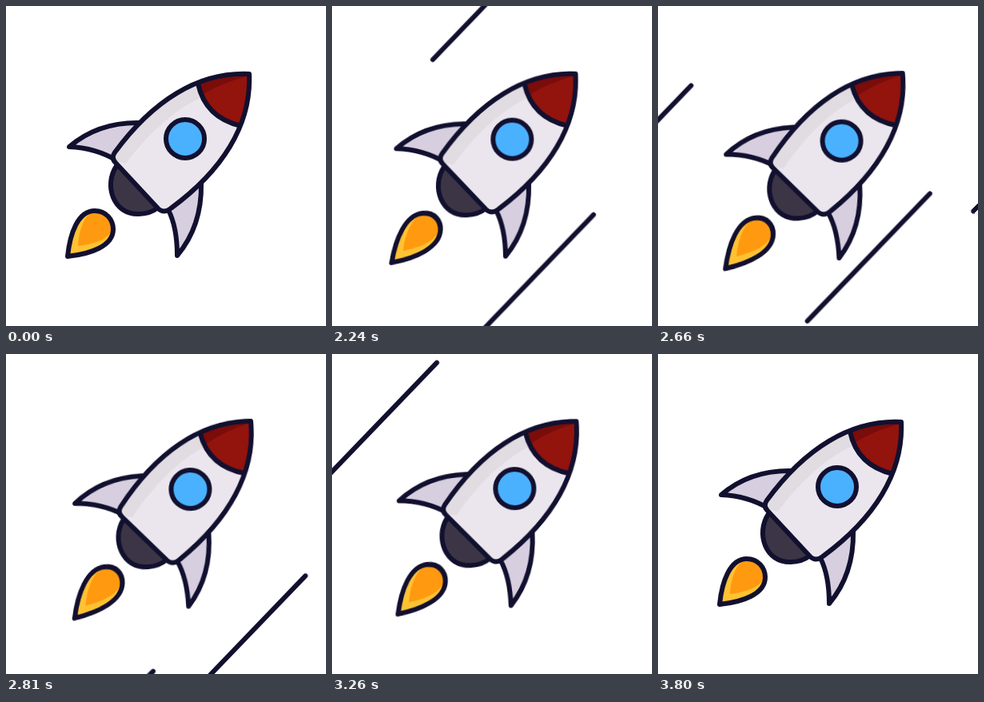
An HTML page without scripts that plays this animation: 400 by 400 pixels, repeating every 3.89 s.

```html
<!DOCTYPE html>
<html lang="en">
<head>
<meta charset="utf-8">
<title>Rocket</title>
<style>
  html, body { margin: 0; width: 100%; height: 100%; overflow: hidden; background: #fff; }
  svg { display: block; width: 100%; height: 100%; }
  .ink { stroke: #12102f; stroke-width: 6; stroke-linecap: round; stroke-linejoin: round; }

  .rocket {
    transform-origin: 285px 48px;
    animation: sway 3890ms infinite;
  }
  @keyframes sway {
    0%, 52.18% { transform: rotate(0deg); animation-timing-function: cubic-bezier(.32, .1, .6, 1); }
    74.94% { transform: rotate(-3.15deg); animation-timing-function: cubic-bezier(.37, 0, .63, 1); }
    97.65%, 100% { transform: rotate(0deg); }
  }

  .flame {
    transform-origin: 127px 263px;
    animation: burn 3890ms linear infinite;
  }
  @keyframes burn {
    0%, 52.17% { transform: rotate(135deg) scale(1, 1) rotate(-135deg); }
    52.18% { transform: rotate(135deg) scale(1.06, .96) rotate(-135deg); }
    57.6% { transform: rotate(135deg) scale(1.11, .95) rotate(-135deg); }
    64.5% { transform: rotate(135deg) scale(1.1, .96) rotate(-135deg); }
    72.2% { transform: rotate(135deg) scale(1.12, .95) rotate(-135deg); }
    83.8% { transform: rotate(135deg) scale(1.09, .96) rotate(-135deg); }
    97.65%, 100% { transform: rotate(135deg) scale(1, 1) rotate(-135deg); }
  }

  /* --t: when the leading end crosses the diagonal; each streak passes once per loop */
  .streaks path {
    animation: rush 3890ms linear infinite;
    animation-delay: calc(var(--t) - 5835ms);
  }
  @keyframes rush {
    from { transform: translateX(-2917.5px); }
    to { transform: translateX(2917.5px); }
  }
</style>
</head>
<body>
<svg viewBox="0 0 400 400">
  <defs>
    <path id="hull" d="M304 85C240 82 183 119 136 183Q131 190 137 196L190 253Q197 260 206 253C270 206 307 149 304 85Z"/>
    <path id="drop" d="M77 313C80 284 90 256 111 256C125 256 134 267 134 279C134 300 106 310 77 313Z"/>
    <clipPath id="inHull"><use href="#hull"/></clipPath>
    <clipPath id="inDrop"><use href="#drop"/></clipPath>
  </defs>

  <g class="streaks ink" fill="none" transform="rotate(133.87)">
    <path d="M0-416.6h-196" style="--t:2136ms"/>
    <path d="M0-137.3h-200" style="--t:2267ms"/>
    <path d="M0-540h-200" style="--t:2443ms"/>
    <path d="M0-98.7h-200" style="--t:2499ms"/>
    <path d="M0-407.4h-221" style="--t:2558ms"/>
    <path d="M0-462h-196" style="--t:2720ms"/>
    <path d="M0-102h-200" style="--t:3183ms"/>
    <path d="M0-440h-196" style="--t:3360ms"/>
  </g>

  <g class="rocket">
    <g class="flame">
      <use href="#drop" fill="#ffc233"/>
      <path clip-path="url(#inDrop)" fill="#ff9a10" d="M90 300C91 280 98 258 114 256L140 256L135 274C130 292 112 297 90 300Z"/>
      <use href="#drop" class="ink" fill="none"/>
    </g>

    <path class="ink" fill="#3c3546" d="M138 200C122 224 134 261 166 260Q180 260 190 252"/>
    <g class="ink" fill="#d7cfdf">
      <path d="M140 194Q112 177 79 176Q115 145 167 146"/>
      <path d="M203 255Q214 277 214 312Q245 275 244 222"/>
    </g>

    <use href="#hull" fill="#ebe6ee"/>
    <g clip-path="url(#inHull)">
      <path fill="#e1dce2" d="M250 80V112C215 125 177 160 150 197L120 190V80Z"/>
      <path fill="#93130d" d="M240 97C246 125 264 143 294 150L330 150V60H240Z"/>
      <path fill="#7a0c0a" d="M240 97L247 110Q272 95 304 87V60H240Z"/>
      <path class="ink" fill="none" d="M240 97C246 125 264 143 294 150"/>
    </g>
    <use href="#hull" class="ink" fill="none"/>
    <circle class="ink" cx="224" cy="166" r="24" fill="#4ab1ff" stroke-width="5.5"/>
  </g>
</svg>
</body>
</html>
```
